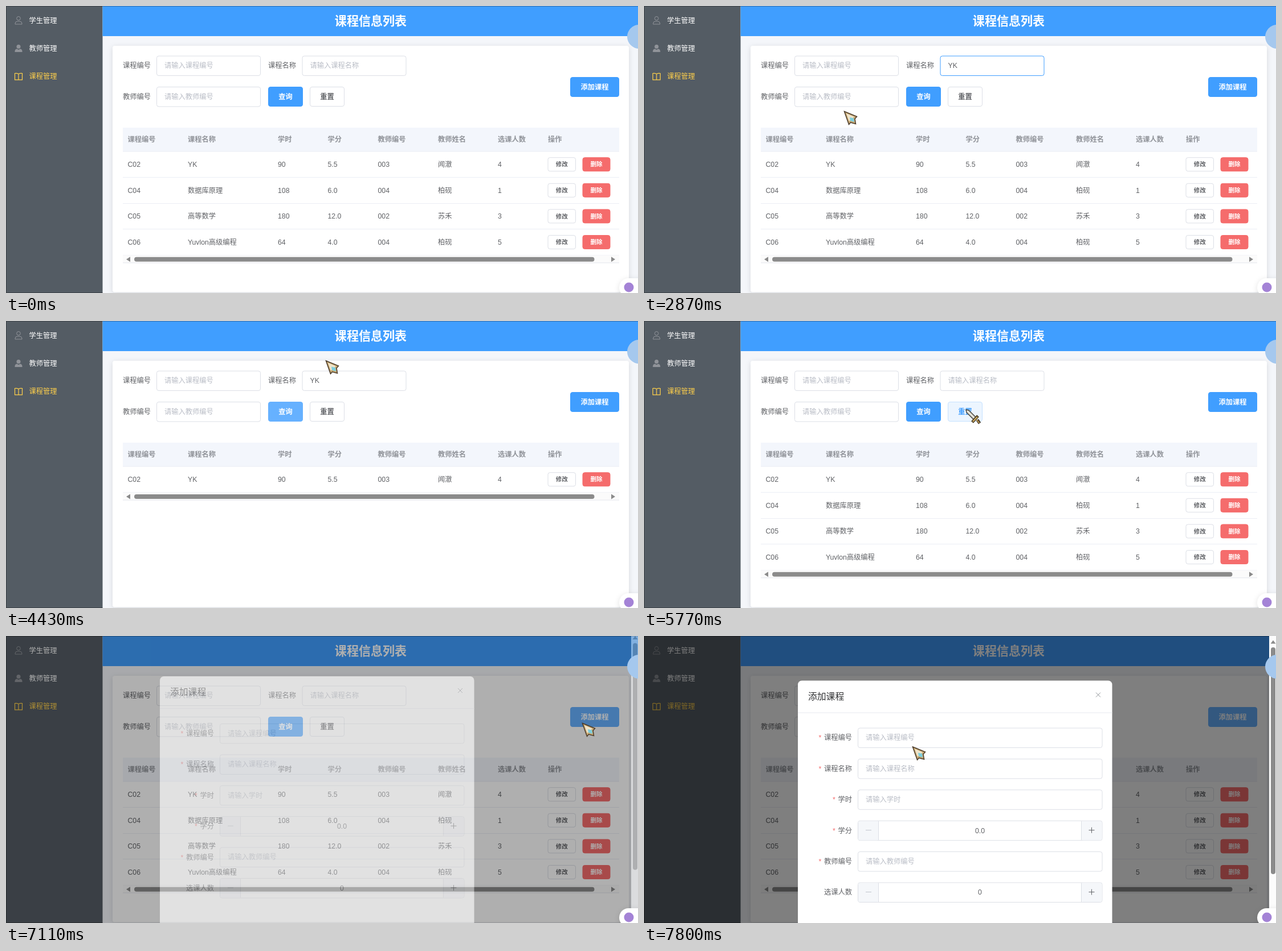
Write an HTML page that moves like this. It is 1109 by 505 pixels and loops after 8000 ms.

```html
<!DOCTYPE html>
<html lang="zh-CN">
<head>
<meta charset="utf-8">
<title>课程信息列表</title>
<style>
  html, body { margin: 0; width: 100%; height: 100%; overflow: hidden; }
  svg { display: block; width: 100vw; height: 100vh; }
  text { font-family: "Liberation Sans", "Noto Sans CJK SC", "Noto Sans CJK", sans-serif; white-space: pre; }
  .card { filter: drop-shadow(0 2px 5px rgba(0, 0, 0, .12)); }
  .bold { font-weight: 700; }
  .mid { text-anchor: middle; }
  .end { text-anchor: end; }
</style>
</head>
<body>
<svg id="stage" viewBox="0 0 1109 505"></svg>
<script>
const LOOP = 8000;
const BLUE = '#409eff', LIGHT_BLUE = '#66b1ff', RED = '#f56c6c';
const INK = '#606266', GREY = '#909399', HINT = '#b9bdc6', BORDER = '#dcdfe6', LINE = '#ebeef5', BAR = '#8b8b8b';
const stage = document.getElementById('stage');

// ---- drawing helpers ----
const text = (x, y, str, fill = INK, cls = '', size = 12.28) =>
  `<text x="${x}" y="${y + size * .36}" fill="${fill}" font-size="${size}" class="${cls}">${str}</text>`;
const box = (x, y, w, h, fill, stroke = 'none', r = 0) =>
  `<rect x="${x}" y="${y}" width="${w}" height="${h}" rx="${r}" fill="${fill}" stroke="${stroke}"/>`;
const path = (d, fill, stroke = 'none', width = 1) =>
  `<path d="${d}" fill="${fill}" stroke="${stroke}" stroke-width="${width}"/>`;
const disc = (x, y, r, fill, stroke = 'none') =>
  `<circle cx="${x}" cy="${y}" r="${r}" fill="${fill}" stroke="${stroke}"/>`;
const group = (content, attrs) => `<g ${attrs}>${content}</g>`;

const button = (x, y, w, h, label, fill, stroke = fill, ink = '#fff', size = 12.28) =>
  box(x + .5, y + .5, w - 1, h - 1, fill, stroke, 3.5) + text(x + w / 2, y + h / 2, label, ink, 'mid bold', size);

const input = (x, y, w, hint, value = '', stroke = BORDER) =>
  box(x + .5, y + .5, w - 1, 34.5, '#fff', stroke, 3.5) +
  text(x + 14, y + 17.3, value || hint, value ? INK : HINT);

// ---- page ----
function sidebar() {
  return box(0, 0, 169.5, 505, '#545c64') +
    disc(22, 21.8, 3.3, 'none', GREY) + path('M16 32v-1q0-4 4-4h4q4 0 4 4v1z', 'none', GREY) +
    disc(22, 71.5, 3.5, GREY) + path('M15.5 81v-1q0-4.5 4-4.5l2.5 1.5 2.5-1.5q4 0 4 4.500v1z', GREY) +
    path('M22 119.500q-3-1.500-6.500-1v11.300h13v-11.300q-3.500-.5-6.500 1v10.500', 'none', '#ffd04b', 1.2) +
    text(40.5, 25.5, '学生管理', '#fff') + text(40.5, 74.7, '教师管理', '#fff') + text(40.5, 124, '课程管理', '#ffd04b');
}

function form(s) {
  const nameBorder = s.focus ? BLUE : s.nameHover ? '#c0c4cc' : BORDER;
  const reset = s.resetHover ? ['#ecf5ff', '#c6e2ff', BLUE] : ['#fff', BORDER, INK];
  return text(205, 105, '课程编号') + input(264, 87.5, 183, '请输入课程编号') +
    text(460, 105, '课程名称') + input(519.5, 87.5, 183, '请输入课程名称', s.name, nameBorder) +
    text(205, 159.5, '教师编号') + input(264, 142, 183, '请输入教师编号') +
    button(460, 142, 61, 35, '查询', s.searchFill) +
    button(533, 142, 61, 35, '重置', ...reset) +
    button(990, 125, 86, 35, '添加课程', s.addFill);
}

const COLUMNS = [213.5, 319, 477, 564.5, 652.5, 758, 863, 951];
const HEADINGS = ['课程编号', '课程名称', '学时', '学分', '教师编号', '教师姓名', '选课人数', '操作'];
const COURSES = [
  ['C02', 'YK', '90', '5.5', '003', '闻澈', '4'],
  ['C04', '数据库原理', '108', '6.0', '004', '柏砚', '1'],
  ['C05', '高等数学', '180', '12.0', '002', '苏禾', '3'],
  ['C06', 'Yuvlon高级编程', '64', '4.0', '004', '柏砚', '5'],
];

function table(rowCount) {
  const pitch = 45.6, bottom = 256 + rowCount * pitch;
  const rows = COURSES.slice(0, rowCount).map((cells, i) => {
    const mid = 278.7 + i * pitch;
    return cells.map((c, k) => text(COLUMNS[k], mid, c)).join('') +
      button(950.5, mid - 12.5, 49.5, 25, '修改', '#fff', BORDER, INK, 10.5) +
      button(1011.5, mid - 12.5, 49, 25, '删除', RED, RED, '#fff', 10.5) +
      box(205, Math.round(mid + 22.3), 871, 1, LINE);
  }).join('');
  const y = bottom + 7.400;
  return box(205, 214, 871, 42, '#f3f6fc') + box(205, 255.5, 871, 1, LINE) +
    HEADINGS.map((h, k) => text(COLUMNS[k], 235, h, GREY, 'bold')).join('') + rows +
    box(205, bottom, 871, 13.5, '#fbfbfb') + box(205, bottom + 13, 871, 1, '#e4e7ed') +
    box(225, y - 4, 807.5, 8, BAR, 'none', 4) +
    path(`M211 ${y}l7-4.500v9zM1069 ${y}l-7-4.500v9z`, BAR);
}

// ---- dialog ----
function stepper(y, value) {
  const mid = y + 17.5;
  return box(375.5, y + .5, 428.500, 34.5, '#fff', BORDER, 3.5) +
    box(376, y + 1, 35.5, 33.5, '#f5f7fa', 'none', 3) + box(767.5, y + 1, 36, 33.5, '#f5f7fa', 'none', 3) +
    path(`M411.500 ${y + 1}v33.500M767.500 ${y + 1}v33.500`, 'none', BORDER) +
    path(`M389 ${mid - .5}h10`, 'none', '#c0c4cc') +
    path(`M780.500 ${mid - .5}h10m-5-5v10`, 'none', INK) +
    text(589.5, mid, value, INK, 'mid');
}

const FIELDS = [['课程编号'], ['课程名称'], ['学时'], ['学分', '0.0'], ['教师编号'], ['选课人数', '0']];

function dialog(s) {
  const fields = FIELDS.map(([label, count], i) => {
    const y = 161.500 + i * 54.4;
    const border = i === 0 && s.codeHover ? '#c0c4cc' : BORDER;
    return text(365, y + 17.5, label, INK, 'end') +
      (i < 5 ? text(360 - label.length * 12.28 - 2, y + 17.5, '*', RED, 'mid') : '') +
      (count ? stepper(y, count) : input(375, y, 429.5, '请输入' + label, '', border));
  }).join('');
  return box(270, 78.5, 551.5, 500, '#fff', 'none', 7) +
    text(288, 106, '添加课程', '#303133', '', 15.8) +
    path('M793 99.500l8 8m0-8l-8 8', 'none', GREY) +
    box(270, 134.500, 551.5, 1, '#e8eaef') + fields +
    box(1097, 0, 12, 540, '#fcfcfc') + box(1100, 20, 8, 399, BAR, 'none', 4) +
    path('M1099.500 13.500h9l-4.500-6z', BAR);
}

function overlay(s) {
  if (!s.open) return '';
  const p = s.open;
  const panel = group(dialog(s), `opacity="${p}" transform="translate(0 ${-20 * (1 - p)})"`);
  return group(box(0, 0, 1109, 505, 'rgba(0,0,0,.5)') + panel, `opacity="${p}"`);
}

// ---- pointer ----
const POINTERS = {
  arrow: path('M.5.5L22.500 9.500 19 13.500 20.500 22.500 11.500 20 8.500 23.500z', '#c8a973', '#4b3c2b', 1.5) +
    path('M4 4L18 10 9 18z', '#efe4cb') + path('M10 11L17 12.500 18 19 11 17z', '#7ccfdf'),
  sword: path('M0 0L5 1 18 14 14 18 1 5z', '#c9c8be', '#403d38', 1.3) + path('M2 2L16 16', 'none', '#f1f0e8', 1.5) +
    path('M20 18L24 24', 'none', '#3d3022', 5) + path('M21 11L11 22', 'none', '#463821', 5) +
    path('M20 12.500L12 21', 'none', '#c9a95f', 2.5) + path('M19 18L23.500 23.500', 'none', '#a98a4d', 2.5),
  beam: path('M-2.500-7h5M0-7V7M-2.500 7h5', 'none', '#444'),
};

function pointer(s) {
  if (!s.pointer) return '';
  const [kind, x, y] = s.pointer;
  const halo = s.click ? disc(0, .5, 10.5, 'rgba(214,226,40,.68)') : '';
  return group(halo + POINTERS[kind], `transform="translate(${x} ${y})"`);
}

// ---- timeline: each step changes only the listed parts ----
const TIMELINE = [
  [0, { pointer: null, click: false, focus: false, nameHover: false, resetHover: false, codeHover: false,
        name: '', rows: 4, searchFill: BLUE, addFill: BLUE, open: 0 }],
  [190, { pointer: ['arrow', 1036, 335] }],
  [420, { pointer: ['arrow', 850, 270] }],
  [640, { pointer: ['arrow', 642, 203] }],
  [870, { pointer: ['arrow', 562, 128] }],
  [1090, { pointer: ['beam', 550, 105], nameHover: true }],
  [1300, { focus: true }],
  [1530, { pointer: null, nameHover: false }],
  [2200, { name: 'YK' }],
  [2870, { pointer: ['arrow', 351, 185] }],
  [3100, { pointer: ['arrow', 432, 178] }],
  [3320, { pointer: ['sword', 492, 166], searchFill: LIGHT_BLUE }],
  [3540, { click: true, focus: false, searchFill: '#3a8ee6' }],
  [3770, { rows: 1, searchFill: LIGHT_BLUE }],
  [3980, { click: false }],
  [4430, { pointer: ['arrow', 561, 69.500] }],
  [4650, { pointer: ['beam', 563, 105], nameHover: true }],
  [4870, { pointer: ['arrow', 566, 130], nameHover: false }],
  [5090, { pointer: ['sword', 565, 156], resetHover: true }],
  [5540, { click: true, searchFill: BLUE }],
  [5770, { click: false, name: '', rows: 4 }],
  [5990, { pointer: ['arrow', 640, 135], resetHover: false }],
  [6220, { pointer: ['arrow', 861, 93] }],
  [6440, { pointer: ['sword', 1011, 155], addFill: LIGHT_BLUE }],
  [6660, { click: true }],
  [6900, { addFill: '#3a8ee6' }],
  [7110, { pointer: ['arrow', 1011, 153], click: false, addFill: LIGHT_BLUE, open: .625 }],
  [7330, { pointer: ['arrow', 800, 150], open: 1 }],
  [7560, { pointer: ['arrow', 518, 150], codeHover: true }],
  [7800, { pointer: ['arrow', 471, 194.500], codeHover: false }],
];

function render(s) {
  stage.innerHTML =
    box(0, 0, 1109, 505, '#f4f6fa') + sidebar() +
    box(169.5, 0, 939.5, 53, BLUE) + text(640, 26.5, '课程信息列表', '#fff', 'mid bold', 21.05) +
    group(box(187, 70, 906, 433.5, '#fff', 'none', 4), 'class="card"') +
    form(s) + table(s.rows) +
    path('M169.500 504.500H.5V.5H1109', 'none', 'rgba(0,0,0,.3)') +
    overlay(s) +
    disc(1111, 54, 21, '#a5c8ee') +
    group(box(1076, 479, 50, 33, '#fff', 'none', 16.5), 'class="card"') + disc(1093, 495, 8.5, '#a483d6') +
    pointer(s);
}

let shown = -1;
function frame(now) {
  const t = now % LOOP;
  const past = TIMELINE.filter(([start]) => start <= t);
  if (past.length !== shown) {
    shown = past.length;
    render(Object.assign({}, ...past.map(([, change]) => change)));
  }
  requestAnimationFrame(frame);
}
frame(0);
</script>
</body>
</html>
```
